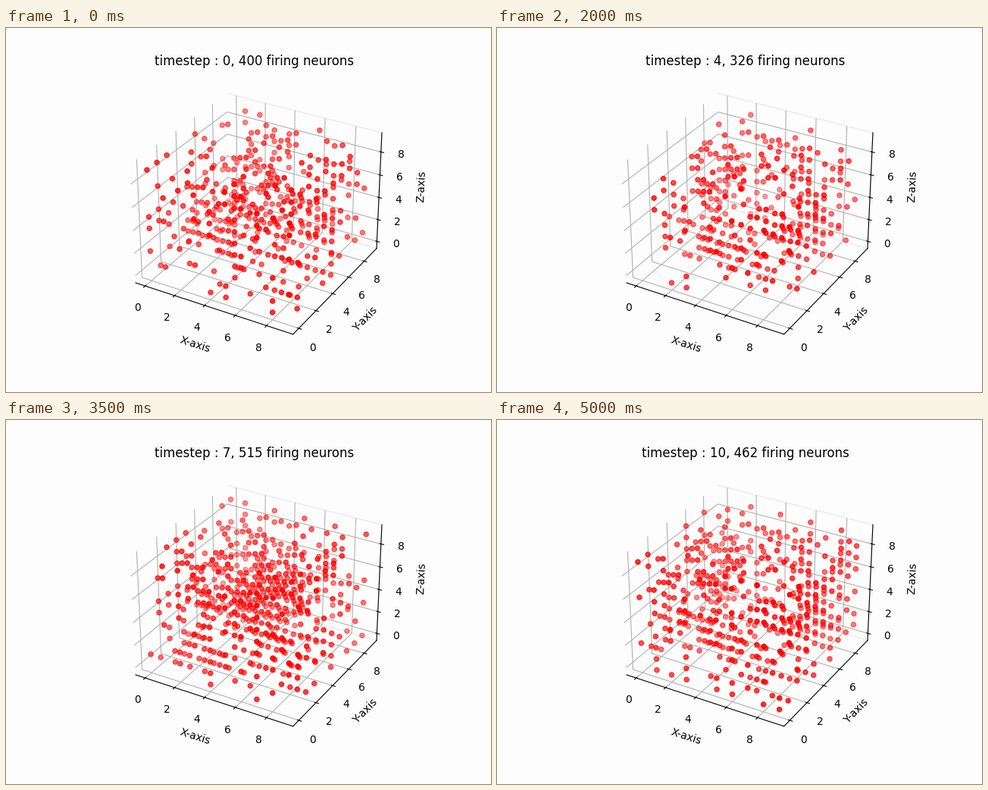
A matplotlib script that plays this animation: 640 by 480 pixels, repeating every 5500 ms.

```python
import numpy as np
import matplotlib.pyplot as plt
from matplotlib.animation import FuncAnimation

N = 10
STEPS = 11
PAPER = "#fdfdfd"

# How many neurons join the wave at steps 1, 2, 3, ...
JOINING = [130, 198, 200, 128, 130, 100, 55, 30, 19, 6]

# Axis spans that differ from the full lattice, as (x, y, z)
FULL = (0, 9)
SPANS = {
    1: ((1, 8), (1, 8), (1, 8)),
    2: ((1, 8), FULL, FULL),
    3: ((1, 9), FULL, FULL),
}

rng = np.random.default_rng(7)
cells = np.indices((N, N, N)).reshape(3, -1).T
seeded = rng.permutation(len(cells)) < 400

# A tall core fires first, then a wave that grows more ragged outwards;
# the x faces are reached late.
offset = np.abs(cells - (4.8, 4.9, 4.8)) / (1, 1, 1.35)
delay = np.linalg.norm(offset, ord=3, axis=1) * rng.uniform(0.7, 1.3, len(cells))
delay += 1.0 * (cells[:, 0] == 0) + 0.5 * (cells[:, 0] == 9)
rank = np.argsort(np.argsort(delay))
first = 1 + np.searchsorted(np.cumsum(JOINING), rank, side="right")


def firing(t):
    """Neurons firing at step t: once reached, each fires every other step."""
    if t == 0:
        return cells[seeded]
    return cells[(first <= t) & ((t - first) % 2 == 0)]


def padded(lo, hi):
    """Data span with the usual 5 % margin plus the 3D view margin."""
    pad = 0.05 * (hi - lo)
    pad += (hi - lo + 2 * pad) / 48
    return lo - pad, hi + pad


fig = plt.figure(figsize=(6.4, 4.8), dpi=100, facecolor=PAPER)
ax = fig.add_subplot(projection="3d", facecolor=PAPER)
ax.set_xlabel("X-axis")
ax.set_ylabel("Y-axis")
ax.set_zlabel("Z-axis")
ax.xaxis.pane.set_visible(False)
ax.zaxis.pane.set_visible(False)
ax.yaxis.pane.set(fill=False, edgecolor="#ebebeb", alpha=1)

dots = None


def draw(t):
    global dots
    if dots is not None:
        dots.remove()
    on = firing(t)
    dots = ax.scatter(*on.T, c="red", marker="o")
    setters = (ax.set_xlim, ax.set_ylim, ax.set_zlim)
    for set_lim, span in zip(setters, SPANS.get(t, (FULL,) * 3)):
        set_lim(*padded(*span))
    ax.set_title(f"timestep : {t}, {len(on)} firing neurons")
    return [dots]


anim = FuncAnimation(fig, draw, frames=STEPS, interval=500, repeat=True,
                     repeat_delay=0, blit=False)
plt.show()
```
